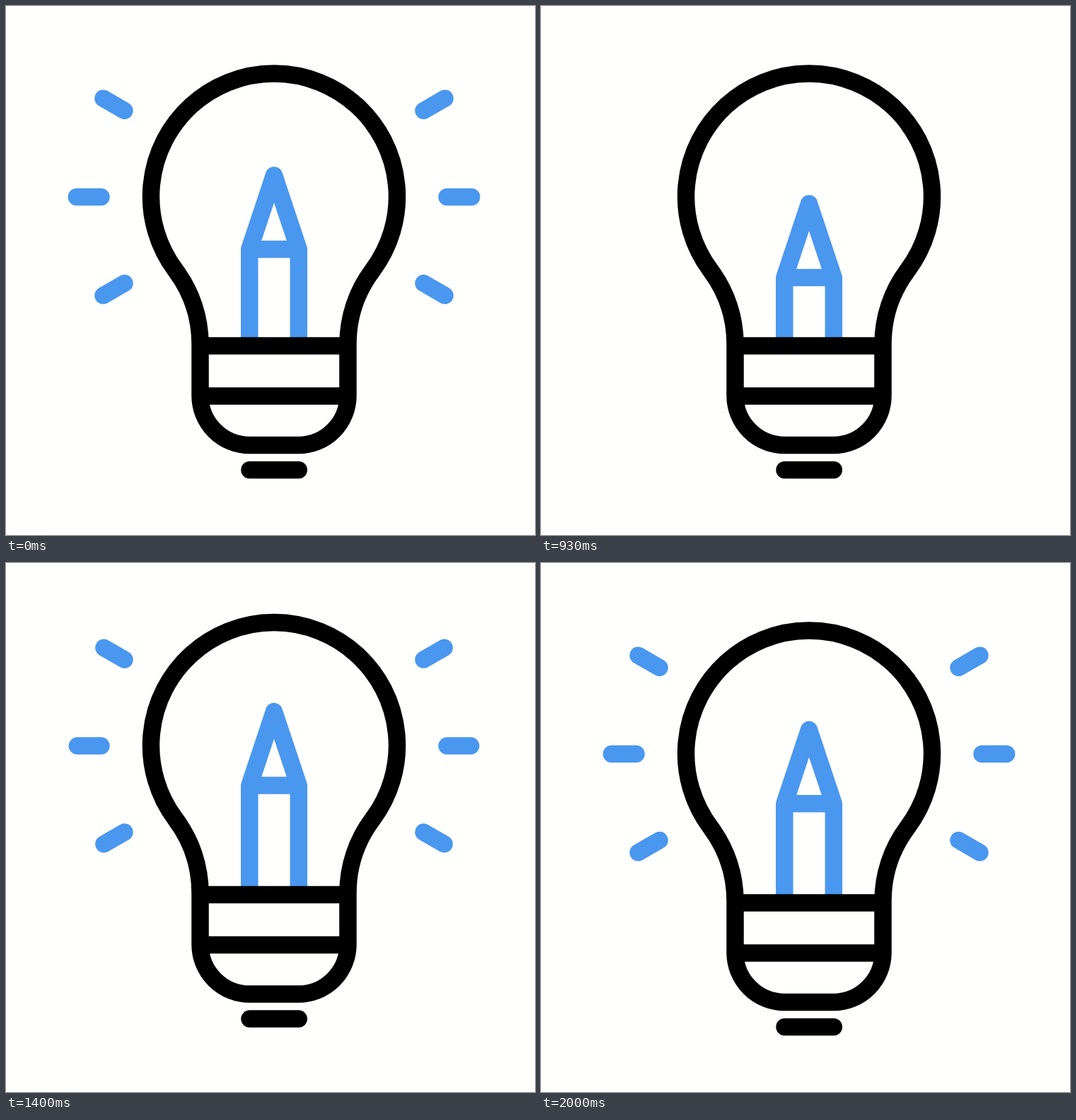
An HTML page that plays this animation: 748x748 px, repeating every 2.07 s.

```html
<!DOCTYPE html>
<html lang="en">
<head>
<meta charset="utf-8">
<title>Light bulb</title>
<style>
html, body { margin: 0; height: 100%; overflow: hidden; background: #fffffd; }
svg { display: block; width: 100vw; height: 100vh; }
path { fill: none; stroke: #000; stroke-width: 24.5; stroke-linejoin: round; }
.blue { stroke: #4a97f0; }
.round { stroke-linecap: round; }
</style>
</head>
<body>
<svg viewBox="0 0 748 748">
  <g id="bulb">
    <path id="rays" class="blue round"/>
    <path id="pencil" class="blue"/>
    <path d="M274.5 478.3A174 174 0 0 0 239.8 373.9A174 174 0 1 1 518.2 373.9A174 174 0 0 0 483.5 478.3V551A70 70 0 0 1 413.5 621H344.5A70 70 0 0 1 274.5 551ZM274.5 480.5H483.5M274.5 551.5H483.5"/>
    <path class="round" d="M344.5 656H413.8"/>
  </g>
</svg>
<script>
const LOOP = 2070, FPS = 15;
const [bulb, rays, pencil] = ['bulb', 'rays', 'pencil'].map(id => document.getElementById(id));

// Vertical offsets as [time, value]; the pencil is relative to the bulb.
const bulbKeys = [[933, 0], [1267, -36], [1495, 3], [1833, 0]];
const pencilKeys = [[1003, 40], [1306, -21], [1642, -4.3], [1955, -4.3], [2530, 40]];

const clamp = u => Math.min(1, Math.max(0, u));
const ease = u => (1 - Math.cos(Math.PI * clamp(u))) / 2;

function track(keys, t) {
  let value = keys[0][1];
  for (let i = 1; i < keys.length; i++) {
    const [t0, v0] = keys[i - 1], [t1, v1] = keys[i];
    if (t >= t0) value = v0 + (v1 - v0) * ease((t - t0) / (t1 - t0));
  }
  return value;
}

function rayLength(t) {
  return t < 1000
    ? 1 - ease(t / 540)
    : 1 - (1 - clamp((t - 1074) / 473)) ** 3;
}

function rayPath(amount) {
  if (amount <= 0) return '';
  let d = '';
  for (const side of [-1, 1]) {
    for (const row of [-1, 0, 1]) {
      const x = 379 + side * (row ? 211.5 : 244.5);
      const dx = side * (row ? 30 : 34.7) * amount;
      d += `M${x} ${270 + row * 122}l${dx} ${row * 17.3 * amount}`;
    }
  }
  return d;
}

function draw(t) {
  const y = 344 + track(pencilKeys, t < 1003 ? t + LOOP : t);
  bulb.setAttribute('transform', `translate(0 ${track(bulbKeys, t)})`);
  pencil.setAttribute('d', `M344.3 480V${y}L379 ${y - 104.5}L413.8 ${y}V480M344.3 ${y}H413.8`);
  rays.setAttribute('d', rayPath(rayLength(t)));
}

function tick() {
  // The motion is stepped at 15 poses per second.
  const step = Math.floor((performance.now() % LOOP + 4) * FPS / 1000);
  draw(Math.min(step, 30) * 1000 / FPS);
  requestAnimationFrame(tick);
}
tick();
</script>
</body>
</html>
```
